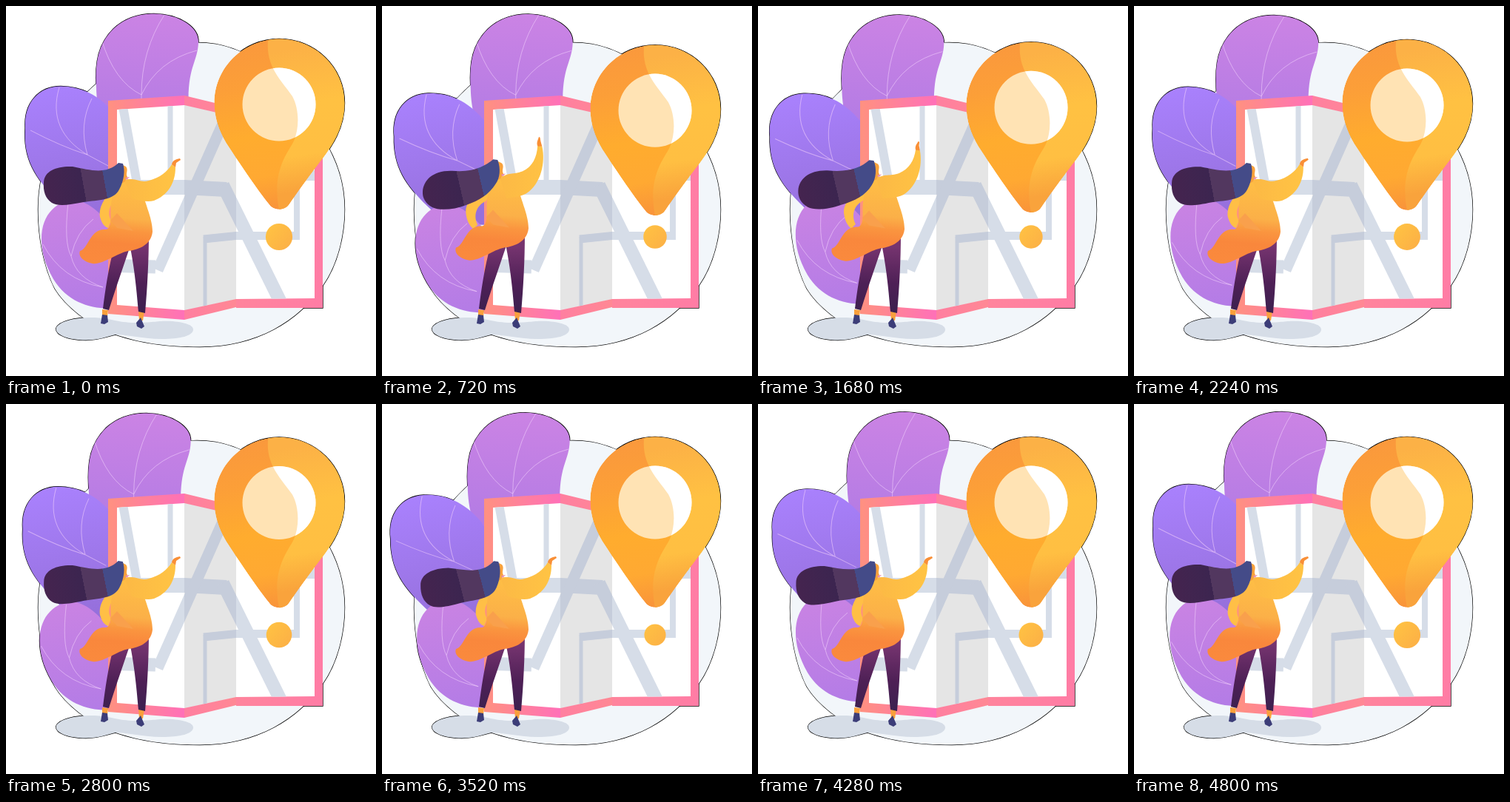
An HTML page with a canvas for the animation above (4.84 s loop, 500 by 500 pixels).

```html
<!DOCTYPE html>
<html lang="en">
<head>
<meta charset="utf-8">
<title>Map pin</title>
<style>
  html, body { margin: 0; height: 100%; overflow: hidden; background: #fff; }
  canvas { display: block; }
</style>
</head>
<body>
<canvas id="stage" width="500" height="500"></canvas>
<script>
const ctx = document.getElementById('stage').getContext('2d');
const LOOP = 4840;

// Gradient along a line; stops are [offset, colour] pairs.
function gradient(x0, y0, x1, y1, ...stops) {
  const g = ctx.createLinearGradient(x0, y0, x1, y1);
  stops.forEach(([at, color]) => g.addColorStop(at, color));
  return g;
}

// Blend two path strings that share the same commands.
function mix(a, b, k) {
  const target = b.match(/-?[\d.]+/g);
  let i = 0;
  return a.replace(/-?[\d.]+/g, n => +n + (target[i++] - n) * k);
}

// Sine-eased interpolation through [time, value] keys.
function ease(keys, t) {
  const i = keys.findIndex(key => key[0] > t);
  if (i < 0) return keys[keys.length - 1][1];
  const [t0, v0] = keys[i - 1], [t1, v1] = keys[i];
  return v0 + (v1 - v0) * (1 - Math.cos(Math.PI * (t - t0) / (t1 - t0))) / 2;
}

const path = d => new Path2D(d);
function fill(d, color) {
  ctx.fillStyle = color;
  ctx.fill(typeof d === 'string' ? path(d) : d);
}
function line(d, color, width) {
  ctx.strokeStyle = color;
  ctx.lineWidth = width;
  ctx.stroke(path(d));
}
function isolated(draw) {
  ctx.save();
  draw();
  ctx.restore();
}

const armKeys = [[0, 0], [800, 1], [1400, 1], [2300, 0]];
const pinKeys = [[0, 0], [900, 9], [2300, 1], [3400, 0]];

const blob = path('M43.5 275C43.5 215 70 160 97 130C130 92 190 49.5 258 49.5C330 49.5 375 95 428 178C448 210 457.5 240 457.5 275C457.5 310 448 350 428 378C395 425 340 460.5 262 460.5C215 460.5 180 455 148 444C110 430 80 405 66 382C50 350 43.5 310 43.5 275Z');
const ground = path('M67.5 436C70 426 95 421 115 421C140 421 150 428 175 428C200 428 205 425 225 426C245 428 253 432 253 437C253 446 235 450 210 450C185 450 165 444 148 444C135 447 125 451.5 108 451.5C85 451.5 67.5 445 67.5 436Z');
const mapShape = path('M138 128L241 121L311 138L428 130V408H311L241 424L138 416Z');
const pinShape = path('M369 44.5C418 44.5 457.5 83 457.5 131C457.5 165 440 190 427 207C409 230 391.5 255 382.5 268C377 277 361 277 355.5 268C340.5 250 310.5 205 297.5 185C287.5 168 281.5 150 281.5 131C281.5 83 321 44.5 369 44.5Z');
const pinLight = path('M355 40C348 80 372 100 387 122C397 140 397 170 386 188C372 210 360 235 370 280H470V40Z');
const pinHole = path('M319.5 133a49.5 49.5 0 1 0 99 0a49.5 49.5 0 1 0 -99 0Z');

const leaves = [
  {
    shape: path('M150 200C130 170 122.5 140 122 110C120 75 125 51 145 31C162 15 182 10.5 200 10.5C235 11 261 29 260 49C259 75 247 80 246.5 125V200Z'),
    veins: 'M129 45Q146 102 183 120M214 12Q183 60 183 120M258 60Q205 74 183 120V128',
    color: gradient(190, 10, 180, 150, [0, '#cb83e4'], [1, '#b57ce4']),
    place(w) { ctx.translate(-5.5 * (1 - Math.cos(w)), 1 - Math.cos(w)); }
  },
  {
    shape: path('M26 165C24 130 45 108.5 74 108.5C100 109 126 118 150 150L175 200V290C110 290 88 283 74 268C38 232 23 205 26 165Z'),
    veins: 'M33 168Q75 190 110 201M72 110C60 150 75 180 110 201M116 125Q98 160 110 201L138 216',
    color: gradient(70, 108, 100, 280, [0, '#a981fd'], [1, '#9670dc']),
    place(w) {
      ctx.translate(303, 410);
      ctx.rotate(-0.031 * (1 - Math.cos(2 * w)));
      ctx.translate(-303, -410);
    }
  },
  {
    shape: path('M48 315C48 280 70 262 95 262C120 268 135 290 145 300L150 408C118 411 84 402 64 369C52 348 48 330 48 315Z'),
    veins: 'M50 322Q75 370 131 380M84 266Q78 320 88 338Q95 368 131 380M118 288Q95 305 88 338',
    color: gradient(85, 265, 115, 408, [0, '#c983e3'], [1, '#b47ce6']),
    place(w) { ctx.translate(-3 * Math.sin(2 * w), 6 * Math.sin(2 * w)); }
  }
];

const panels = [
  {
    frame: 'M138 128L241 121V424L138 416Z', sheet: 'M150 140L241 134V411L150 404Z',
    pink: gradient(138, 0, 241, 0, [0, '#ff9180'], [1, '#ff70b8']), paper: '#fff', road: '#d6dde8'
  },
  {
    frame: 'M241 121L311 138V407L241 424Z', sheet: 'M241 134L311 150V396L241 411Z',
    pink: gradient(241, 0, 311, 0, [0, '#ff7fa0'], [1, '#ff8894']), paper: '#e5e5e5', road: '#c6cddb'
  },
  {
    frame: 'M311 138L428 130V408H311Z', sheet: 'M311 150L417 143V395L311 396Z',
    pink: gradient(311, 0, 428, 0, [0, '#ff849c'], [1, '#ff7ca5']), paper: '#fff', road: '#d6dde8'
  }
];
const roads = [
  [12, 'M158 136L178 245'], [7, 'M222 130V240'], [20, 'M150 245H241L298 248'],
  [15, 'M297 150L205 357'], [18, 'M150 351L202 352.5'], [18, 'M293 242L372 402'],
  [5, 'M269 405V312'], [11, 'M267 315L311 310.5H397'], [8, 'M393 230V314'], [14, 'M393 229H420']
];

const hair = [
  'M51 238C52 222 70 216 90 217C115 222 135 228 152 212L158 213C161 222 160 235 153 248C145 263 125 262 105 265C85 269 70 271 62 266C53 260 50 250 51 238Z',
  'M54 246C56 231 69 218 95 220C125 224 140 215 151 207L157 208C161 220 159 233 153 240C143 254 130 262 112 267C95 273 75 273 66 268C57 262 53 255 54 246Z'
];
const frontArm = [
  'M160 236C175 230 180 240 193 236C208 232 218 224 224 214L229 218C229 240 218 256 200 263C190 266 180 262 170 260Z',
  'M160 234C168 224 178 228 190 223C203 217 209 205 210 188L216 189C221 210 215 240 195 253C185 258 178 258 168 260Z'
];
const hand = [
  'M224 214C225 209 229 207 235 206L236 208L230 212L229 218Z',
  'M210 189C208 184 210 181 211.5 176L213 177L214 182L216 189Z'
];
const backArm = [
  'M150 245C135 255 125 270 127 285C129 292 132 298 138 300L142 290C136 280 140 268 150 260Z',
  'M150 240C126 252 112 264 113 279C114 290 118 297 123 301L129 296C123 284 126 270 141 263Z'
];

const hairColor = gradient(51, 245, 160, 225,
  [0, '#45244f'], [.48, '#3c2550'], [.48, '#52375f'], [.74, '#52375f'], [.74, '#444b88'], [1, '#444b88']);
const tunicColor = gradient(165, 235, 155, 350,
  [0, '#ffbf45'], [.45, '#fbb048'], [.6, '#fa953f'], [.75, '#f9873c'], [1, '#fa8a3d']);
const armColor = gradient(160, 0, 225, 0, [0, '#fcb945'], [1, '#ffc344']);
const legColor = gradient(0, 325, 0, 415, [0, '#76346f'], [.55, '#4e2056'], [1, '#3c204f']);
const pinColor = gradient(320, 55, 360, 274, [0, '#fa993c'], [.25, '#fc9f38'], [.55, '#ffac2e'], [.8, '#ffa932'], [1, '#f9943a']);
const lightColor = gradient(370, 60, 400, 250, [0, '#fcb146'], [.4, '#ffc142'], [.75, '#ffbf42'], [1, '#f9a33c']);
const dotColor = gradient(355, 300, 383, 324, [0, '#ffc143'], [1, '#fcb146']);

function drawMap() {
  for (const { frame, sheet, pink, paper, road } of panels) {
    fill(frame, pink);
    isolated(() => {
      fill(sheet, paper);
      ctx.clip(path(sheet));
      roads.forEach(([width, d]) => line(d, road, width));
    });
  }
}

function drawPin() {
  ctx.clip(pinShape);
  fill(pinShape, pinColor);
  fill(pinLight, lightColor);
  fill(pinHole, '#ffe3b4');
  ctx.clip(pinHole);
  fill(pinLight, '#fff');
}

function drawWoman(raise, sway) {
  fill('M130 410L138 411L137 420H130ZM179 412H187L185 425H180Z', '#f9a03c');
  fill('M128 429L130 417L137 418L138 427L133 430ZM176 428L182 421L187 433L183 436L177 433Z', '#3c3d78');
  fill('M147 322L170 318C160 348 150 376 139 411L131 409C134 385 138 355 147 322Z', legColor);
  fill('M167 322L193 306C193 345 191 380 188 415L179 413C177 390 174 355 167 322Z', legColor);
  fill(mix(...backArm, raise), '#ffbf46');
  isolated(() => {
    ctx.translate(0, -4.5 * raise);
    fill('M150 240C160 232 172 232 182 240C186 265 198 285 198 305C196 325 175 330 165 331C150 334 130 350 117 348C105 346 97 338 100 331C112 328 113 300 135 302C145 300 140 280 142 268C143 258 145 248 150 240Z', tunicColor);
    fill('M141 290L150 280L172 304L150 300Z', '#f9a04c');
  });
  fill(mix(...frontArm, raise), armColor);
  fill(mix(...hand, raise), '#f98f36');
  isolated(() => {
    ctx.translate(0, -4.5 * raise);
    fill('M156 214L162 217C166 222 161 226 164 231L160 238L154 240Z', '#f9a23c');
    fill('M161 232L167 231L163 235Z', '#e88fae');
  });
  ctx.translate(156, 225);
  ctx.rotate(-0.035 * (1 - sway));
  ctx.translate(-156, -225);
  fill(mix(...hair, raise), hairColor);
}

function render(t) {
  const w = 2 * Math.PI * t / LOOP;
  const sway = Math.cos(2 * w);
  const drop = ease(pinKeys, t);

  ctx.clearRect(0, 0, 500, 500);

  // Dark hairline around the combined silhouette.
  ctx.strokeStyle = '#000';
  ctx.lineWidth = 1.4;
  [blob, ground, mapShape].forEach(shape => ctx.stroke(shape));
  leaves.forEach(leaf => isolated(() => { leaf.place(w); ctx.stroke(leaf.shape); }));
  isolated(() => { ctx.translate(0, drop); ctx.stroke(pinShape); });

  fill(blob, '#f2f6fa');
  fill(ground, '#d6dde7');
  leaves.forEach(leaf => isolated(() => {
    leaf.place(w);
    fill(leaf.shape, leaf.color);
    ctx.clip(leaf.shape);
    line(leaf.veins, 'rgba(240,205,250,.6)', 1);
  }));
  drawMap();

  ctx.fillStyle = dotColor;
  ctx.beginPath();
  ctx.arc(369, 312, 16.3 + 1.8 * sway, 0, 2 * Math.PI);
  ctx.fill();
  isolated(() => { ctx.translate(0, drop); drawPin(); });
  isolated(() => drawWoman(ease(armKeys, t), sway));
}

const start = performance.now();
function tick() {
  render((performance.now() - start) % LOOP);
  requestAnimationFrame(tick);
}
tick();
</script>
</body>
</html>
```
